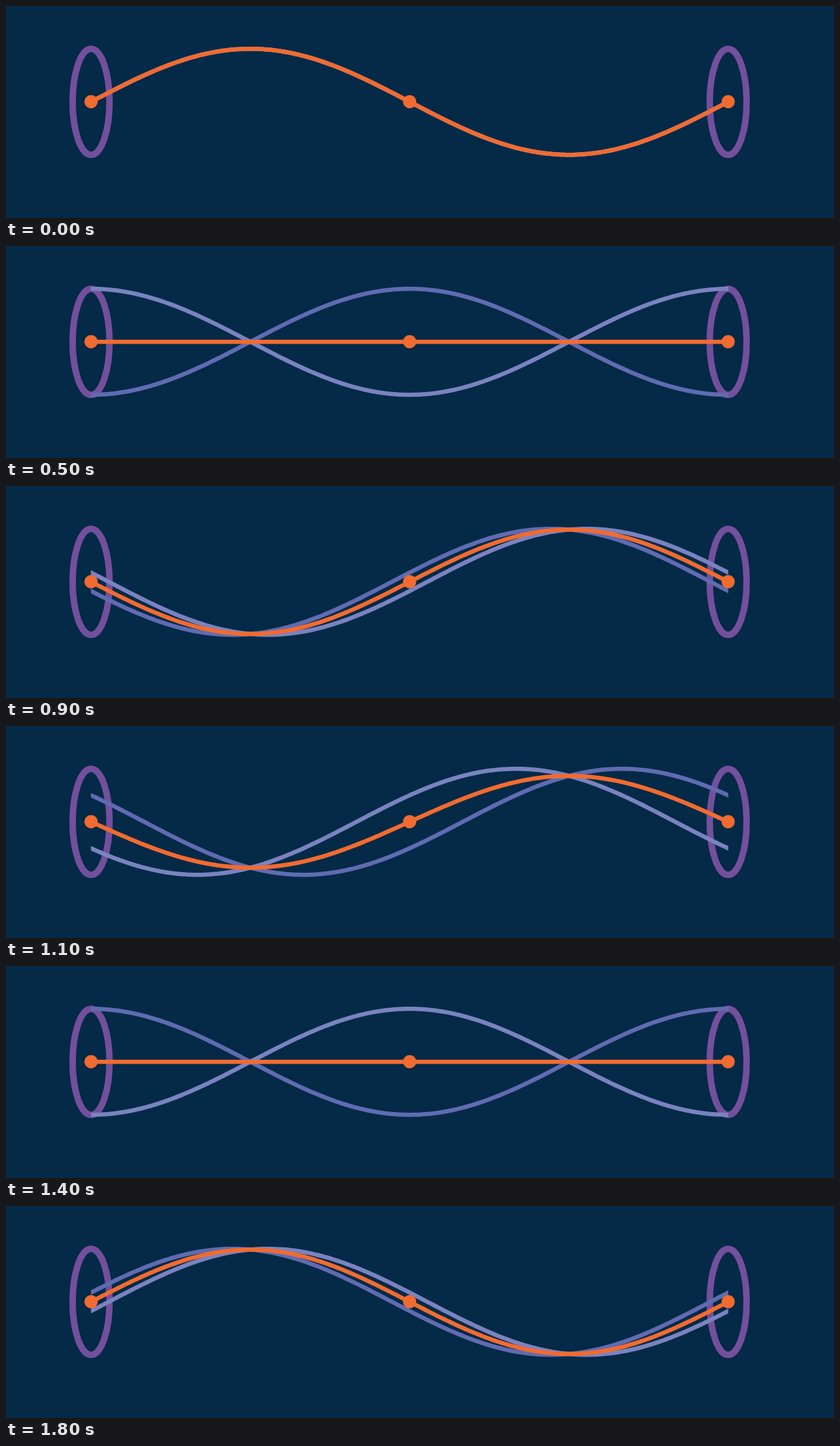
An HTML page that plays this animation: 1280x328 px, repeating every 1850 ms.

```html
<!DOCTYPE html>
<html lang="en">
<head>
<meta charset="utf-8">
<title>Standing wave</title>
<style>
  html, body { margin: 0; width: 100%; height: 100%; overflow: hidden; background: #042a47; }
  svg { display: block; width: 100%; height: 100%; }
  .ring { fill: none; stroke: #744f9c; stroke-width: 10; }
  .wave { fill: none; stroke-width: 6.5; }
  .node { fill: #f26b30; }
</style>
</head>
<body>
<svg viewBox="0 0 1280 328">
  <clipPath id="span"><rect x="131.3" y="0" width="985.2" height="328"/></clipPath>
  <ellipse class="ring" cx="131.5" cy="148.3" rx="28.5" ry="82"/>
  <ellipse class="ring" cx="1116.4" cy="148.3" rx="28.5" ry="82"/>
  <g clip-path="url(#span)">
    <path class="wave" id="rightward" stroke="#606bb1"/>
    <path class="wave" id="leftward" stroke="#7a83c0"/>
    <path class="wave" id="sum" stroke="#f26b30"/>
  </g>
  <circle class="node" cx="131.5" cy="148" r="10.3"/>
  <circle class="node" cx="624" cy="148" r="10.3"/>
  <circle class="node" cx="1116.4" cy="148" r="10.3"/>
</svg>
<script>
const LOOP = 1850, STEP = 50;
const LEFT = 131.5, LENGTH = 985, MIDDLE = 148.2, AMPLITUDE = 82;

function drawWave(id, height) {
  const points = [];
  // Run slightly past both ends so the clip cuts them vertically.
  for (let x = -5; x <= LENGTH + 5; x += 5) {
    const y = MIDDLE - AMPLITUDE * height(2 * Math.PI * x / LENGTH);
    points.push(`${LEFT + x},${y.toFixed(2)}`);
  }
  document.getElementById(id).setAttribute("d", "M" + points.join("L"));
}

function render(time) {
  // The first pose lasts two steps, then the phase advances 10° per step.
  const step = Math.max(0, Math.floor((time % LOOP) / STEP) - 1);
  const phase = step * Math.PI / 18;
  drawWave("rightward", a => Math.sin(a - phase));
  drawWave("leftward", a => Math.sin(a + phase));
  drawWave("sum", a => Math.sin(a) * Math.cos(phase));
}

const start = performance.now();
function tick() {
  render(performance.now() - start);
  requestAnimationFrame(tick);
}
tick();
</script>
</body>
</html>
```
